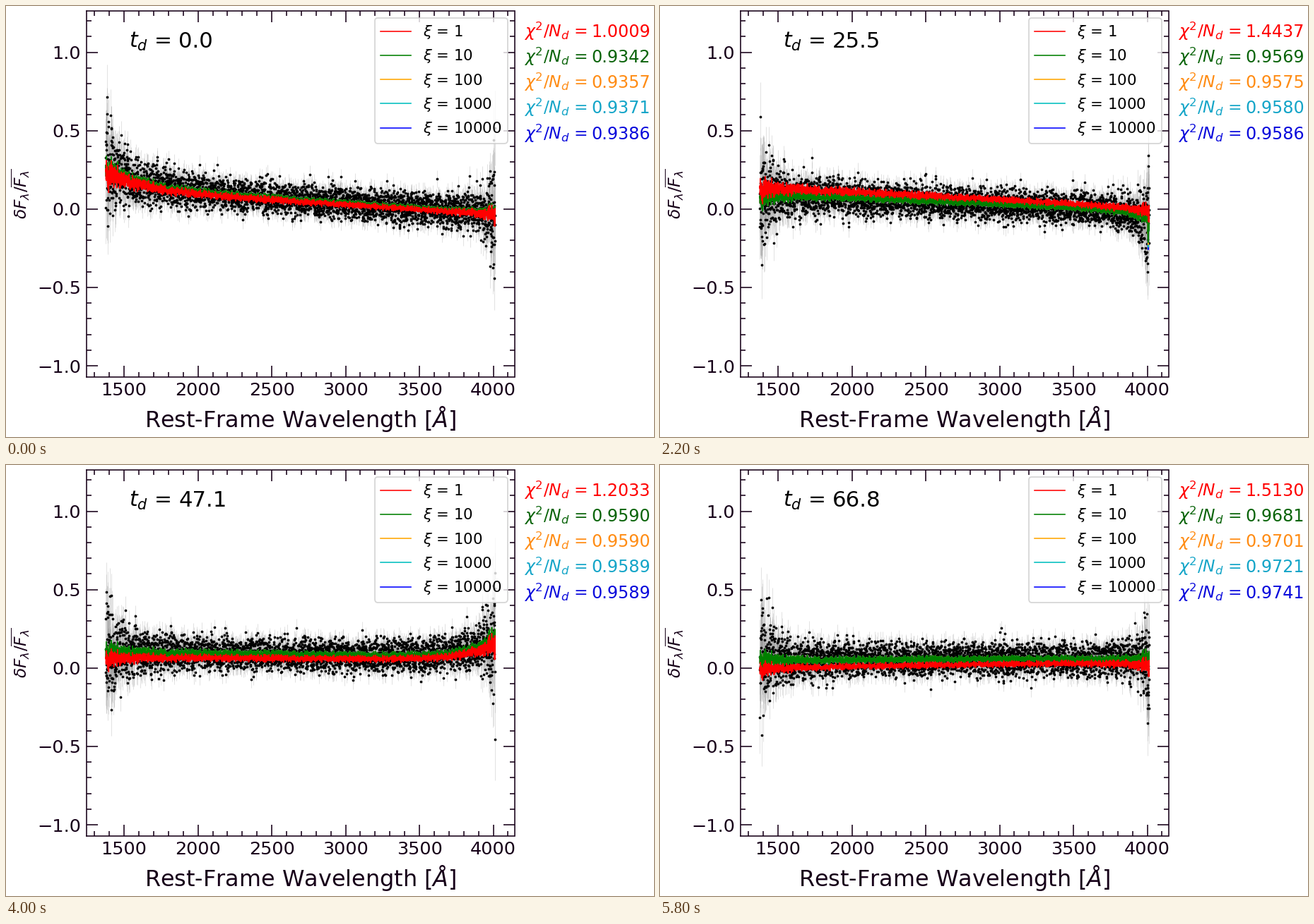
Write a matplotlib script that moves like this. It is 917x611 px and loops after 6 s.

```python
import numpy as np
import matplotlib.pyplot as plt
from matplotlib.animation import FuncAnimation
from matplotlib.collections import LineCollection
from matplotlib.ticker import MultipleLocator

W, H, DPI = 917, 611, 64
FRAMES, STEP = 30, 200
INK = "#160018"
LINE_COLORS = ["red", "green", "orange", "c", "blue"]
TEXT_COLORS = ["red", "#0a640a", "#ff8c14", "#14a5c8", "#0a0adc"]

# Key epochs: frame, day, chi2 for xi = 1, 10 and 10000,
# then level and tilt of the stiff fit and its gap to the loose fits
EPOCHS = np.array([
    (0, 0.0, 1.0009, .9342, .9386, .045, -.078, .012),
    (5, 14.3, 1.6668, .8896, .8904, .055, .000, .045),
    (11, 25.5, 1.4437, .9569, .9586, .075, -.065, -.032),
    (16, 35.1, 1.0338, .9743, .9747, .050, -.055, .010),
    (20, 47.1, 1.2033, .9590, .9589, .060, -.010, .026),
    (24, 55.6, 1.1172, .9468, .9490, .005, .018, -.020),
    (29, 66.8, 1.5130, .9681, .9741, .020, .017, .036),
])

wave = np.linspace(1375, 4012, 3400)
left, right = wave - wave[0], wave[-1] - wave
slope = (wave - 2700) / 1300


def ends(base, blue, red):
    """Flat value plus exponential rises (height, length) at both ends."""
    return (base + sum(h * np.exp(-left / s) for h, s in blue)
            + sum(h * np.exp(-right / s) for h, s in red))


sigma = ends(.052, [(.12, 50), (.05, 250)], [(.14, 25), (.05, 120)])
ripple = ends(.011, [(.02, 80), (.012, 250)], [(.022, 50), (.01, 150)])
ripple *= np.clip(np.random.default_rng(7).normal(size=wave.size), -2.5, 2.5)
gap_shape = (1 - .3 * slope) * ends(1, [(.5, 150)], [(1, 80)])
dip_shape = np.exp(-((wave - 4006) / 2.5) ** 2)


def pt(size):
    """Font and line sizes of a 12 x 8 inch layout, fitted to the stage."""
    return size * W / 12 / DPI


def label(x, y, s, size, color="black", **kw):
    return fig.text(x / W, 1 - y / H, s, fontsize=pt(size), color=color, **kw)


def fits(k, level, tilt, gap):
    """Mean curves of the stiff fit and the loose fits."""
    blue = -.01 + .125 * np.exp(-(k / 8) ** 4)
    red = .03 + .07 * np.cos(2 * np.pi * (k - 5) / 15)
    stiff = ends(level + tilt * slope, [(blue, 250)], [(red, 200)])
    return stiff, stiff + gap * gap_shape


fig = plt.figure(figsize=(W / DPI, H / DPI), dpi=DPI, facecolor="white")
ax = fig.add_axes([113.7 / W, 1 - 526 / H, 605.8 / W, 519 / H])
ax.set_xlim(1244, 4143.5)
ax.set_ylim(-1.072, 1.2635)

for axis, major, minor in ((ax.xaxis, 500, 100), (ax.yaxis, .5, .1)):
    axis.set_major_locator(MultipleLocator(major))
    axis.set_minor_locator(MultipleLocator(minor))
ax.tick_params(which="both", direction="in", top=True, right=True,
               width=pt(1.5), color=INK)
ax.tick_params(which="major", length=pt(15), pad=pt(7),
               labelsize=pt(24), labelcolor=INK)
ax.tick_params(which="minor", length=pt(7))
for spine in ax.spines.values():
    spine.set(linewidth=pt(1.5), edgecolor=INK)

label(416.5, 597, r"Rest-Frame Wavelength [$\AA$]", 30, INK, ha="center")
label(30, 266.5, r"$\delta F_\lambda/\overline{F_\lambda}$", 22, INK,
      ha="center", va="baseline", rotation=90, rotation_mode="anchor")

bars = LineCollection([], colors="0.5", linewidths=pt(1), alpha=.22, zorder=1)
ax.add_collection(bars, autolim=False)
dots, = ax.plot([], [], "k.", ms=pt(5), mew=pt(1), zorder=2)
lines = [ax.plot([], [], color=c, lw=pt(1.5), zorder=4 - .1 * i,
                 label=rf"$\xi$ = {10 ** i}")[0]
         for i, c in enumerate(LINE_COLORS)]
legend = ax.legend(loc="upper right", fontsize=pt(20),
                   labelspacing=.48, borderaxespad=.46)
legend.get_frame().set_linewidth(pt(1.7))

label(174, 59, "$t_d$ =", 28)
day_text = label(244.2, 59, "", 29)
scores = []
for i, c in enumerate(TEXT_COLORS):
    y = 43.7 + 36.2 * i
    label(733, y, r"$\chi^2/N_d$ =", 22, c)
    scores.append(label(828.4, y, "", 22.5, c))


def update(k):
    rng = np.random.default_rng(100 + k)
    day, chi_stiff, chi_first, chi_last, level, tilt, gap = (
        np.interp(k, EPOCHS[:, 0], col) for col in EPOCHS.T[1:])
    stiff, loose = fits(k, level, tilt, gap)

    flux = loose + sigma * rng.normal(size=wave.size)
    err = sigma * rng.uniform(.85, 1.15, wave.size)
    bars.set_segments(np.stack([np.column_stack([wave, flux - err]),
                                np.column_stack([wave, flux + err])], axis=1))
    dots.set_data(wave, flux)

    for i, line in enumerate(lines):
        base = loose if i else stiff
        dip = 5 * min(gap, 0) * (.9 + .1 * i) if i else 0
        line.set_data(wave, base + ripple * (.75 + 2.5 * np.abs(base))
                      + dip * dip_shape)

    day_text.set_text(f"{day:.1f}")
    values = [chi_stiff, *np.linspace(chi_first, chi_last, 4)]
    for text, value in zip(scores, values):
        text.set_text(f"{value:.4f}")
    return [bars, dots, *lines, day_text, *scores]


anim = FuncAnimation(fig, update, frames=FRAMES, interval=STEP, repeat=True,
                     repeat_delay=0, blit=False)
plt.show()
```
